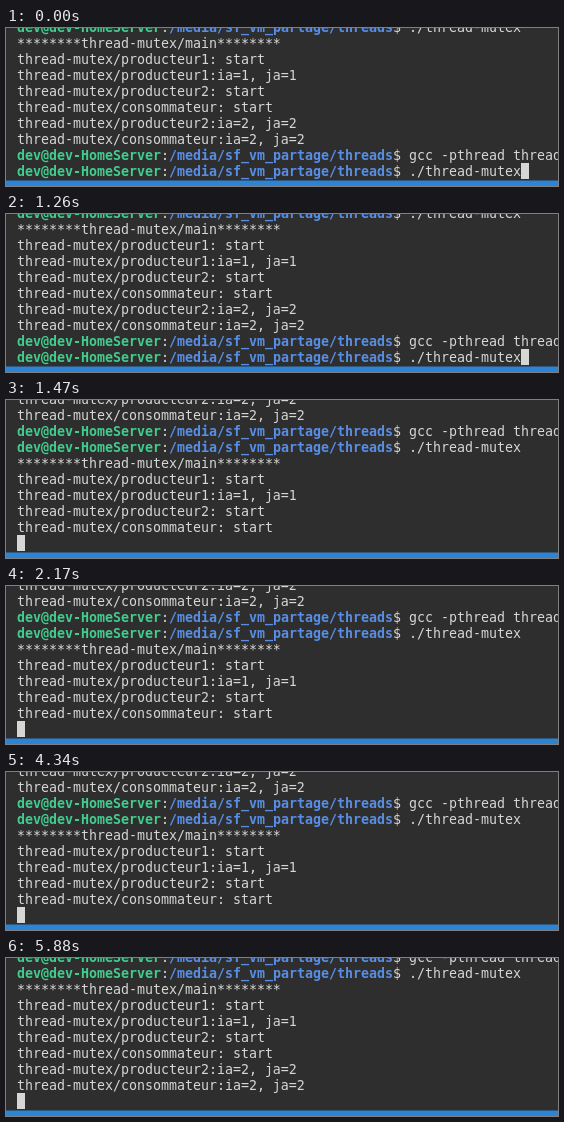
These frames come from a looping animation (552x158 px, 6090 ms). An HTML page with a canvas:

```html
<!DOCTYPE html>
<html lang="fr">
<head>
<meta charset="utf-8">
<title>Terminal</title>
<style>
  html, body { margin: 0; height: 100%; overflow: hidden; background: #2e2e2e; }
  canvas { display: block; }
</style>
</head>
<body>
<canvas id="stage" width="552" height="158"></canvas>
<script>
const ctx = document.getElementById('stage').getContext('2d');

const LOOP = 6090;
const CELL = 8, ROW = 16, LEFT = 11;
const CURSOR_TOP = 135, BASELINE = 13, BAR_TOP = 152.5;
const FONT = '13.29px "DejaVu Sans Mono", monospace';
const COLORS = {
  back: '#2e2e2e', text: '#d6d6d4', user: '#42cc8e', path: '#588ee6', bar: '#2d84d4'
};
const USER = 'dev@dev-HomeServer';
const PATH = '/media/sf_vm_partage/threads';

// A line is a list of [text, color, bold] segments.
const plain = text => [[text, COLORS.text]];
const prompt = command => [
  [USER, COLORS.user, true], [':', COLORS.text],
  [PATH, COLORS.path, true], ['$ ' + command, COLORS.text]
];

const run = prompt('./thread-mutex');
const started = [
  '********thread-mutex/main********',
  'thread-mutex/producteur1: start',
  'thread-mutex/producteur1:ia=1, ja=1',
  'thread-mutex/producteur2: start',
  'thread-mutex/consommateur: start'
].map(plain);
const finished = [
  'thread-mutex/producteur2:ia=2, ja=2',
  'thread-mutex/consommateur:ia=2, ja=2'
].map(plain);

const log = [
  run, ...started, ...finished,
  prompt('gcc -pthread thread-mutex.c'),
  run, ...started, ...finished
];
const empty = [];

// Number of complete lines above the cursor line, from each moment on.
const typed = log.lastIndexOf(run);
const steps = [
  [0, typed],
  [1400, typed + 1],
  [1470, typed + 1 + started.length],
  [4410, log.length]
];

function drawLine(line, top) {
  let column = 0;
  for (const [text, color, bold] of line) {
    ctx.font = (bold ? 'bold ' : '') + FONT;
    ctx.fillStyle = color;
    ctx.fillText(text, LEFT + column * CELL, top + BASELINE);
    column += text.length;
  }
  return column;
}

function draw(time) {
  const count = steps.filter(([start]) => time >= start).pop()[1];
  ctx.fillStyle = COLORS.back;
  ctx.fillRect(0, 0, 552, 158);

  for (let up = 1; up <= 9 && up <= count; up++) {
    drawLine(log[count - up], CURSOR_TOP - up * ROW);
  }
  const column = drawLine(count === typed ? run : empty, CURSOR_TOP);
  ctx.fillStyle = COLORS.text;
  ctx.fillRect(LEFT + column * CELL, CURSOR_TOP, CELL, ROW);

  ctx.fillStyle = COLORS.bar;
  ctx.fillRect(0, BAR_TOP, 552, 158 - BAR_TOP);
}

function tick() {
  draw(performance.now() % LOOP);
  requestAnimationFrame(tick);
}
tick();
</script>
</body>
</html>
```
